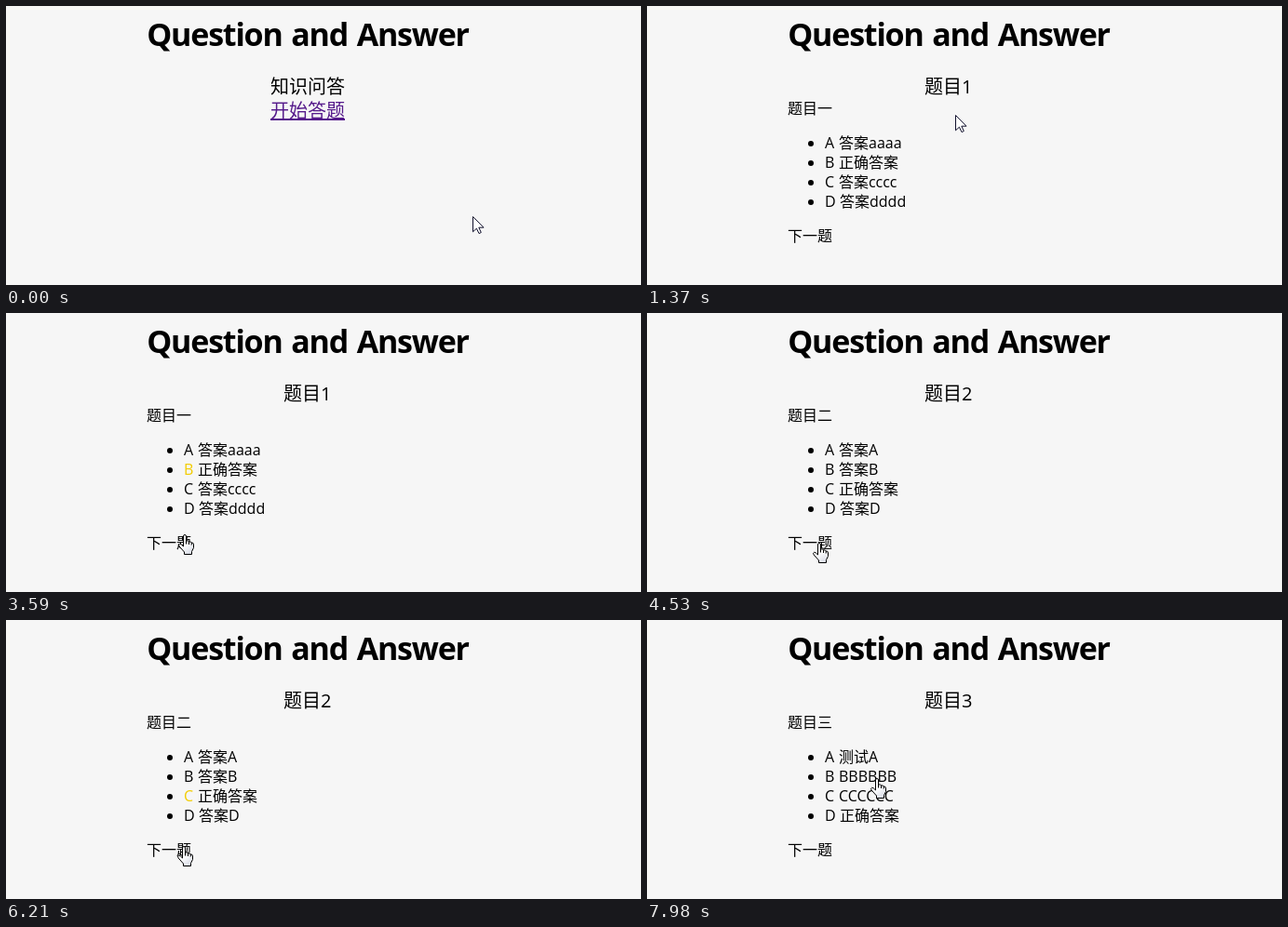
An HTML page with a canvas for the animation above (8000 ms loop, 682x300 px).

```html
<!DOCTYPE html>
<html lang="zh-CN">
<head>
<meta charset="utf-8">
<title>Question and Answer</title>
<style>
  html, body { margin: 0; width: 100%; height: 100%; overflow: hidden; background: #f6f6f6; }
  canvas { display: block; }
</style>
</head>
<body>
<canvas id="stage" width="682" height="300"></canvas>
<script>
const ctx = document.getElementById('stage').getContext('2d');
const LOOP = 8000;
const CENTER = 324;
const SANS = '"Open Sans", "Noto Sans CJK SC", "Noto Sans CJK", sans-serif';

const pages = [
  { from: 1370, title: '题目1', question: '题目一', right: 1, answeredAt: 3060,
    answers: ['答案aaaa', '正确答案', '答案cccc', '答案dddd'] },
  { from: 4220, title: '题目2', question: '题目二', right: 2, answeredAt: 5600,
    answers: ['答案A', '答案B', '正确答案', '答案D'] },
  { from: 6930, title: '题目3', question: '题目三', right: 3, answeredAt: Infinity,
    answers: ['测试A', 'BBBBBB', 'CCCCCC', '正确答案'] }
];

// Pointer moves: first and last step time, step count, then [step, x, y] stops.
const start = [501, 226];
const moves = [
  { t0: 70, t1: 530, steps: 7, stops: [[4, 385, 152], [7, 331, 117]] },
  { t0: 1700, t1: 2370, steps: 10, stops: [[3, 306, 154], [7, 263, 199], [10, 246, 184]] },
  { t0: 2520, t1: 2830, steps: 5, stops: [[3, 241, 170], [5, 239, 168]] },
  { t0: 3290, t1: 3750, steps: 7, stops: [[5, 190, 238], [7, 179, 256]] },
  { t0: 3900, t1: 3900, steps: 1, stops: [[1, 179, 252]] },
  { t0: 4530, t1: 5140, steps: 9, stops: [[1, 183, 247], [7, 222, 199], [9, 230, 189]] },
  { t0: 5830, t1: 6600, steps: 11, stops: [[6, 189, 243], [9, 184, 256], [11, 181, 250]] },
  { t0: 7210, t1: 7750, steps: 8, stops: [[6, 231, 168], [8, 241, 151]] },
  { t0: 7980, t1: 7980, steps: 1, stops: [[1, 245, 170]] }
];

const arrow = new Path2D('M.5 .5V16.8L4.4 13.2L7 18.6L9.3 17.5L6.8 12.2H12Z');
const hand = new Path2D(
  'M5.5 13V2Q5.5 .5 7 .5T8.5 2V7Q11 6.2 11.5 8Q13.7 7.3 14.2 9Q16.5 8.6 16.5 11' +
  'V14.5L14.5 18.5V21.5H6.5V19L1.2 13Q-.2 10.8 1.5 10.3Q3 10 5.5 13Z');
const knuckles = new Path2D('M8.5 7V10.5M11.5 8V11M14.2 9V11.5');

const shade = ctx.createLinearGradient(5, 6, 15, 21);
shade.addColorStop(0.3, '#fff');
shade.addColorStop(1, '#d4d8e4');

function pointerAt(t) {
  let pos = start;
  for (const { t0, t1, steps, stops } of moves) {
    if (t < t0) break;
    const gap = (t1 - t0) / (steps - 1) || 1;
    const step = Math.min(steps, Math.floor((t - t0) / gap + 0.1) + 1);
    let [k0, x0, y0] = [0, ...pos];
    for (const [k, x, y] of stops) {
      const u = Math.min(1, (step - k0) / (k - k0));
      pos = [Math.round(x0 + (x - x0) * u), Math.round(y0 + (y - y0) * u)];
      if (step <= k) break;
      [k0, x0, y0] = [k, x, y];
    }
  }
  return pos;
}

function text(str, x, y, size = 16, color = '#000', align = 'left', weight = 400) {
  ctx.font = `${weight} ${size}px ${SANS}`;
  ctx.textAlign = align;
  ctx.fillStyle = color;
  ctx.fillText(str, x, y);
  return ctx.measureText(str).width;
}

function drawHeading() {
  ctx.letterSpacing = '-1.2px';
  ctx.wordSpacing = '2px';
  text('Question and Answer', CENTER, 43, 34, '#000', 'center', 700);
  ctx.letterSpacing = ctx.wordSpacing = '0px';
}

function drawHome(t) {
  const color = t >= 910 && t < 1060 ? '#f00' : '#551a8b';
  text('知识问答', CENTER, 94, 20, '#000', 'center', 300);
  text('开始答题', CENTER, 120, 20, color, 'center', 300);
  ctx.fillRect(284, 121, 80, 2);
}

function drawPage(page, t) {
  text(page.title, 298, 94, 20);
  text(page.question, 151, 116);
  page.answers.forEach((answer, i) => {
    const y = 153 + 21 * i;
    const chosen = i === page.right && t >= page.answeredAt;
    ctx.fillStyle = '#000';
    ctx.beginPath();
    ctx.arc(176, y - 5, 3, 0, Math.PI * 2);
    ctx.fill();
    const width = text('ABCD'[i] + ' ', 191, y, 16, chosen ? '#f2cc00' : '#000');
    text(answer, Math.ceil(191 + width), y);
  });
  text('下一题', 151, 253);
}

function drawPointer(x, y, page) {
  const inside = (l, t, r, b) => x >= l && x <= r && y >= t && y <= b;
  const clickable = page
    ? inside(191, 137, 497, 221) || inside(151, 237, 497, 258)
    : inside(284, 100, 364, 126);
  const shape = clickable ? hand : arrow;
  ctx.save();
  ctx.translate(clickable ? x - 5 : x, y);
  ctx.lineJoin = 'round';
  ctx.fillStyle = clickable ? shade : '#fff';
  ctx.strokeStyle = clickable ? '#000' : '#10102c';
  ctx.fill(shape);
  ctx.stroke(shape);
  if (clickable) ctx.stroke(knuckles);
  ctx.restore();
}

function draw(t) {
  ctx.fillStyle = '#f6f6f6';
  ctx.fillRect(0, 0, 682, 300);
  drawHeading();
  const page = pages.filter(p => t >= p.from).pop();
  if (page) drawPage(page, t);
  else drawHome(t);
  drawPointer(...pointerAt(t), page);
}

function tick() {
  draw(performance.now() % LOOP);
  requestAnimationFrame(tick);
}
tick();
</script>
</body>
</html>
```
